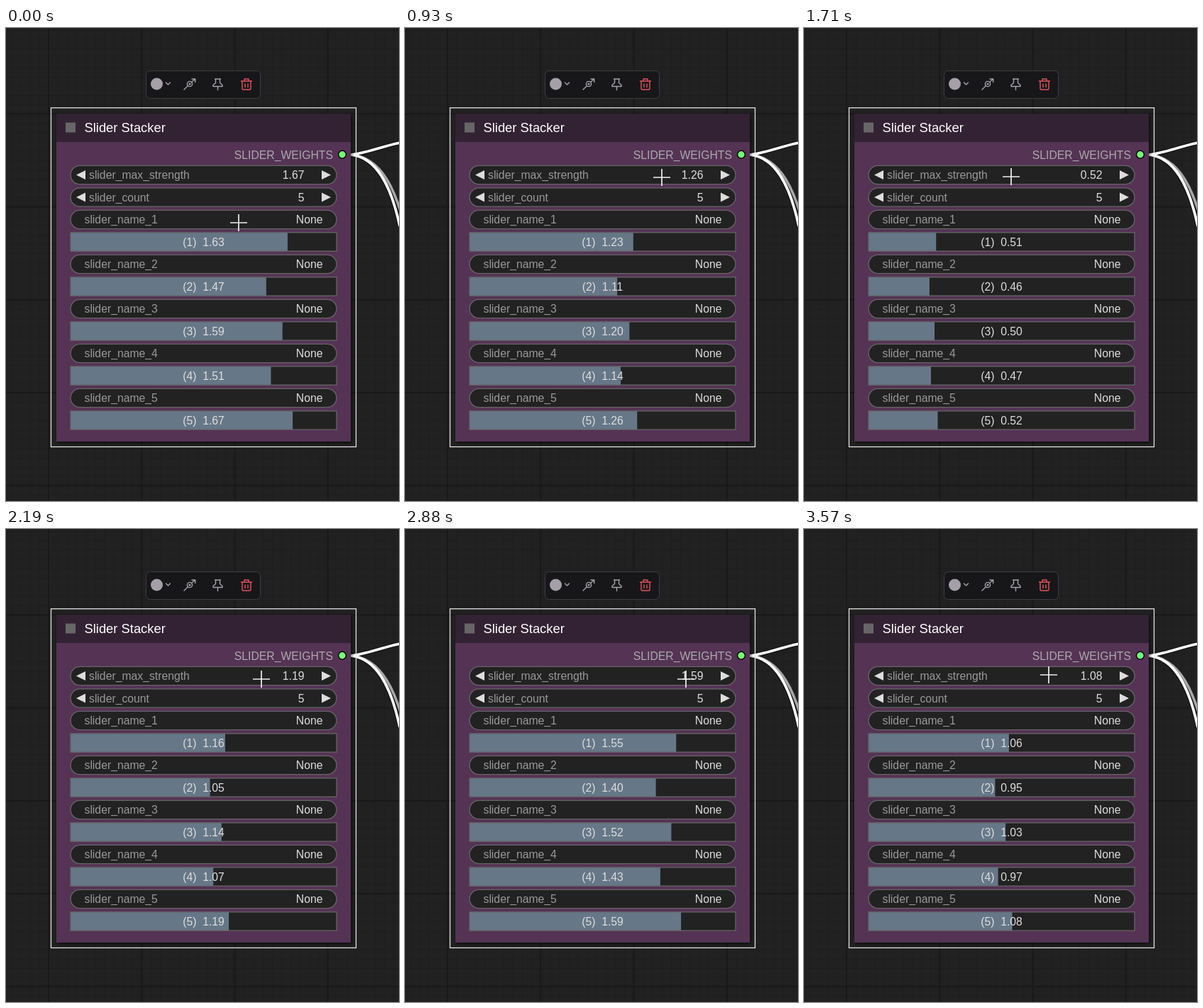
An HTML page for the animation above (3.6 s loop, 554 by 668 pixels).

```html
<!DOCTYPE html>
<html lang="en">
<head>
<meta charset="utf-8">
<title>Slider Stacker</title>
<style>
html, body { margin: 0; width: 100%; height: 100%; overflow: hidden; background: #212121; }
svg { display: block; width: 554px; height: 668px; }
text { font: 15.75px "Liberation Sans", Arial, sans-serif; white-space: pre; fill: #ddd; }
.label { fill: #999; }
.end { text-anchor: end; }
.mid { text-anchor: middle; }
.box { fill: #222; }
.edge { fill: none; stroke: #666; stroke-width: 1.3; }
.icon { fill: none; stroke: #a5a3a8; stroke-width: 1.4; stroke-linecap: round; stroke-linejoin: round; }
.wire { fill: none; stroke: #fff; stroke-width: 3.6; }
.halo { fill: none; stroke: #111; stroke-opacity: .6; stroke-width: 6.5; }
</style>
</head>
<body>
<svg viewBox="0 0 554 668">
  <defs>
    <pattern id="minor" x="60" y="515" width="13.125" height="13.125" patternUnits="userSpaceOnUse">
      <path d="M0 .5H13.125M.5 0V13.125" stroke="#1d1d1d"/>
    </pattern>
    <pattern id="major" x="59" y="514" width="131.25" height="131.25" patternUnits="userSpaceOnUse">
      <path d="M0 1H131.25M1 0V131.25" stroke="#191919" stroke-width="2"/>
    </pattern>
    <filter id="soft"><feGaussianBlur stdDeviation="2"/></filter>
  </defs>
  <rect width="554" height="668" fill="#212121"/>
  <rect width="554" height="668" fill="url(#minor)"/>
  <rect width="554" height="668" fill="url(#major)"/>

  <path class="halo" d="M486 179C508 177 530 167 556 162M486 179C521 182 543 222 555 280"/>
  <path class="wire" stroke-width="3" style="stroke:#a8a8a8" d="M486 179C524 182 544 218 557 262"/>
  <path class="wire" d="M486 179C508 177 530 167 556 162M486 179C521 182 543 222 555 280"/>

  <rect x="73" y="123" width="415" height="463" fill="#000" opacity=".55" filter="url(#soft)"/>
  <rect x="71" y="121" width="415" height="463" fill="#535"/>
  <rect x="71" y="121" width="415" height="40" fill="#323"/>
  <rect x="63.5" y="112.7" width="430" height="478.8" fill="none" stroke="#e0e0e0" stroke-width="1.3"/>
  <rect x="84" y="133.5" width="14" height="14" fill="#666"/>
  <text x="110.5" y="147" style="font-size:18.375px;fill:#fff">Slider Stacker</text>
  <text class="end" x="461" y="185" style="fill:#aaa">SLIDER_WEIGHTS</text>
  <circle cx="474" cy="178.7" r="5.4" fill="#7f7" stroke="#000" stroke-width="1.4"/>

  <g id="toolbar">
    <rect x="197.5" y="60.5" width="161" height="39" rx="6" fill="#17171a" stroke="#3d3d42"/>
    <circle cx="212.5" cy="79" r="8.5" fill="#a5a0a8"/>
    <path class="icon" d="M225.5 77l3 3 3-3"/>
    <path class="icon" d="M251 87l5.5-5.5M261.500 76.500l5-4.500M262 72h4.700v4.500"/>
    <circle class="icon" cx="259" cy="79" r="3.600"/>
    <circle cx="259" cy="79" r="1.500" fill="#a5a3a8"/>
    <path class="icon" d="M298.500 82.500v5M294.500 72h8M295.500 72v5.500l-3.500 3v2h13v-2l-3.500-3V72"/>
    <path class="icon" style="stroke:#e5535c" d="M331.500 75h15M336 75v-3h6v3M333 75v10.500q0 1.500 1.500 1.500h9q1.500 0 1.500-1.500V75M337 79v4.500M341 79v4.500"/>
  </g>

  <g id="rows"></g>
  <path id="cursor" d="M-12 0H12M0-12V12" stroke="#f0f0f0" stroke-width="1.7"/>
</svg>
<script>
const LOOP = 3600, STEP = 30;
const LEFT = 91, WIDTH = 375, MAX = 2;
const RATIOS = [0.977, 0.881, 0.954, 0.902, 1];

// [time, value]
const strengthKeys = [[0, 1.67], [570, 1.67], [930, 1.26], [1380, .42], [1510, .27],
  [1710, .52], [2190, 1.19], [2600, 1.62], [2880, 1.59], [3570, 1.08]];
const xKeys = [[0, 328], [540, 403], [930, 362], [1380, 278], [1510, 263],
  [1710, 292], [2190, 360], [2600, 399], [2880, 396], [3570, 345]];
const yKeys = [[0, 275], [540, 208], [930, 211], [1380, 206], [1710, 210],
  [2190, 212], [2880, 212], [3570, 206]];

const rows = document.getElementById('rows');
const cursor = document.getElementById('cursor');

function add(tag, attrs, content = '') {
  const el = document.createElementNS('http://www.w3.org/2000/svg', tag);
  for (const k in attrs) el.setAttribute(k, attrs[k]);
  el.textContent = content;
  return rows.appendChild(el);
}

const rowY = i => 207.5 + 31.5 * i;
const frame = (i, rx, cls) =>
  add('rect', { class: cls, x: LEFT, y: rowY(i) - 13.1, width: WIDTH, height: 26.25, rx });
const label = (i, x, cls, s) => add('text', { class: cls, x, y: rowY(i) + 5.5 }, s);

function pill(i, name, value, arrows) {
  frame(i, 13.1, 'box');
  frame(i, 13.1, 'edge');
  const y = rowY(i);
  if (arrows) add('path', { fill: '#ddd', d: `M112 ${y - 6.5}v13l-13-6.5zM445 ${y - 6.5}v13l13-6.5z` });
  label(i, arrows ? 117 : 110.5, 'label', name);
  return label(i, arrows ? 420.5 : 446.5, 'end', value);
}

function slider(i) {
  frame(i, 0, 'box');
  const fill = frame(i, 0, 'fill');
  fill.setAttribute('fill', '#678');
  frame(i, 0, 'edge');
  return { fill, text: label(i, 278.5, 'mid', '') };
}

const strength = pill(0, 'slider_max_strength', '', true);
pill(1, 'slider_count', '5', true);
const sliders = RATIOS.map((ratio, n) => {
  pill(2 + 2 * n, `slider_name_${n + 1}`, 'None');
  return { ratio, ...slider(3 + 2 * n) };
});

// Smooth curve through the keys that never overshoots them.
function curve(keys) {
  const slope = i => (keys[i + 1][1] - keys[i][1]) / (keys[i + 1][0] - keys[i][0]);
  const tangents = keys.map((_, i) => {
    if (!i || i === keys.length - 1) return 0;
    const a = slope(i - 1), b = slope(i);
    return a * b > 0 ? 2 * a * b / (a + b) : 0;
  });
  return t => {
    let i = 0;
    while (i < keys.length - 2 && t >= keys[i + 1][0]) i++;
    const [t0, a] = keys[i], [t1, b] = keys[i + 1], h = t1 - t0;
    const u = Math.min((t - t0) / h, 1), v = 1 - u;
    return a * (1 + 2 * u) * v * v + b * (3 - 2 * u) * u * u
      + h * u * v * (tangents[i] * v - tangents[i + 1] * u);
  };
}

const strengthAt = curve(strengthKeys), xAt = curve(xKeys), yAt = curve(yKeys);

function draw(time) {
  const t = Math.floor((time % LOOP) / STEP) * STEP;
  const max = Math.round(strengthAt(t) * 100) / 100;
  strength.textContent = max.toFixed(2);
  sliders.forEach(({ ratio, fill, text }, n) => {
    const value = max * ratio;
    fill.setAttribute('width', value / MAX * WIDTH);
    text.textContent = `(${n + 1})  ${value.toFixed(2)}`;
  });
  cursor.setAttribute('transform', `translate(${Math.round(xAt(t))} ${Math.round(yAt(t))})`);
}

const start = performance.now();
function tick() {
  draw(performance.now() - start);
  requestAnimationFrame(tick);
}
tick();
</script>
</body>
</html>
```
